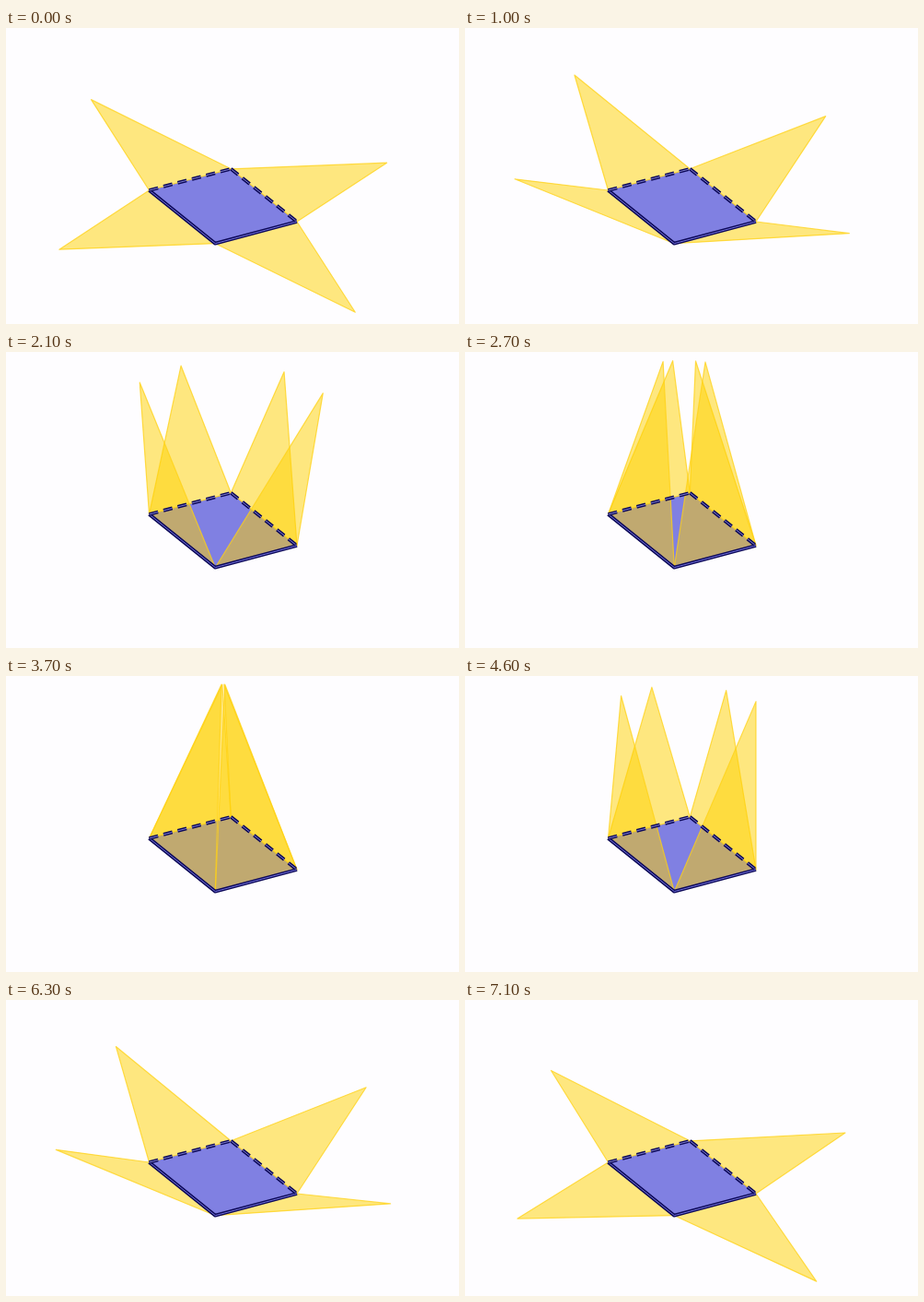
An HTML page with a canvas that plays this animation: 492 by 321 pixels, repeating every 7.2 s.

```html
<!DOCTYPE html>
<html lang="en">
<head>
<meta charset="utf-8">
<title>Folding pyramid net</title>
<style>
  html, body { margin: 0; width: 100%; height: 100%; overflow: hidden; background: #fefdff; }
  canvas { display: block; }
</style>
</head>
<body>
<canvas id="stage" width="492" height="321"></canvas>
<script>
const ctx = document.getElementById('stage').getContext('2d');
const LOOP = 7200, STEP = 100;
const CENTER = [235.7, 193.2], RADIUS = 184;

const left = [155.5, 176], front = [227.3, 233.7], right = [316, 210], back = [244.3, 152.8];

// Each apex swings along a circle; angles are degrees clockwise from the top.
const faces = [
  { edge: [left, back], angle: -51.1 },
  { edge: [back, right], angle: 75.2 },
  { edge: [left, front], angle: -104.8 },
  { edge: [front, right], angle: 128.7 }
];

// Time in ms and how far the net is folded (0 flat, 1 closed).
const keys = [
  [0, 0], [400, .06], [800, .165], [1000, .229], [1600, .457], [2100, .719],
  [2400, .845], [2800, .961], [3200, .998], [3300, 1], [3600, 1], [4000, .965],
  [4400, .862], [4600, .799], [5200, .585], [5600, .459], [6000, .323],
  [6800, .09], [7100, .0095], [7200, 0]
];

function slope(i) {
  if (i === 0 || i === keys.length - 1) return 0;
  const [t0, f0] = keys[i - 1], [t1, f1] = keys[i + 1];
  return (f1 - f0) / (t1 - t0);
}

function foldAt(time) {
  const i = keys.findIndex(key => key[0] > time) - 1;
  const [t0, f0] = keys[i], [t1, f1] = keys[i + 1];
  const span = t1 - t0, u = (time - t0) / span, v = 1 - u;
  const fold = f0 * v * v * (1 + 2 * u) + f1 * u * u * (3 - 2 * u)
    + span * u * v * (slope(i) * v - slope(i + 1) * u);
  return Math.min(1, Math.max(0, fold));
}

function trace(points, closed) {
  ctx.beginPath();
  points.forEach(p => ctx.lineTo(...p));
  if (closed) ctx.closePath();
}

function stroke(color, width, dash = []) {
  ctx.strokeStyle = color;
  ctx.lineWidth = width;
  ctx.setLineDash(dash);
  ctx.stroke();
}

function drawFace({ edge, angle }, fold) {
  const a = angle * (1 - fold) * Math.PI / 180;
  const apex = [CENTER[0] + RADIUS * Math.sin(a), CENTER[1] - RADIUS * Math.cos(a)];
  trace([edge[0], apex, edge[1]], true);
  ctx.fillStyle = 'rgba(255, 210, 0, .5)';
  ctx.fill();
  stroke('rgba(255, 210, 20, .75)', 1.2);
}

function drawBaseEdges() {
  trace([left, front, right]);
  stroke('#0c0858', 3.8);
  stroke('#7474dc', 1);
  for (const edge of [[left, back], [back, right]]) {
    trace(edge);
    stroke('#0c0858', 3.8, [10, 6]);
    stroke('#8080d0', 1, [10, 6]);
  }
}

function draw(time) {
  const fold = foldAt(time);
  ctx.fillStyle = '#fefdff';
  ctx.fillRect(0, 0, 492, 321);
  trace([left, front, right, back], true);
  ctx.fillStyle = '#8080e2';
  ctx.fill();
  faces.forEach(face => drawFace(face, fold));
  drawBaseEdges();
}

ctx.lineJoin = 'round';
const start = performance.now();
function tick() {
  const elapsed = (performance.now() - start) % LOOP;
  draw(Math.floor(elapsed / STEP) * STEP);
  requestAnimationFrame(tick);
}
tick();
</script>
</body>
</html>
```
